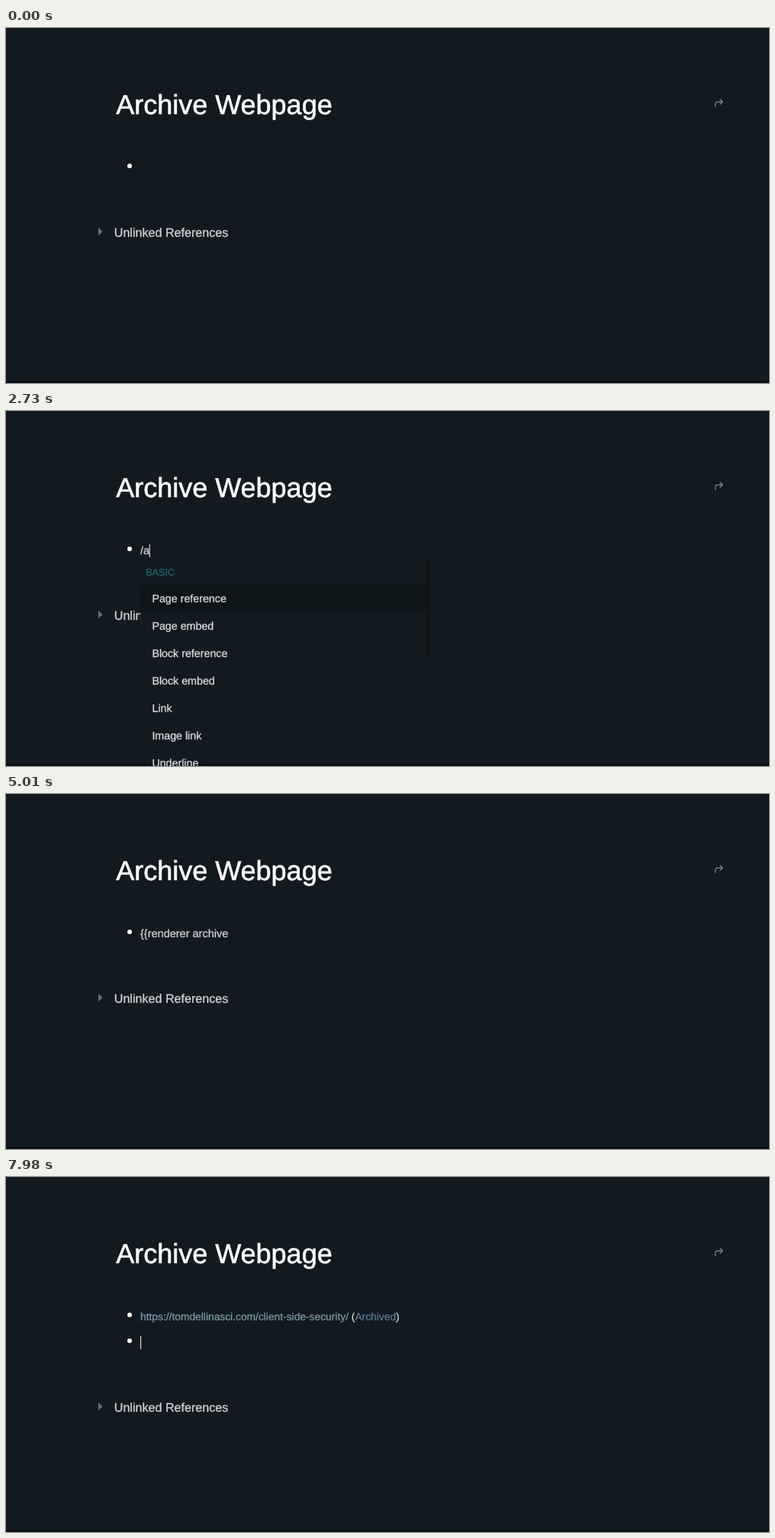
Animation, 1000 px wide and 466 px high, one loop 8 s. Source, as an HTML page:

```html
<!DOCTYPE html>
<html lang="en">
<head>
<meta charset="utf-8">
<title>Archive Webpage</title>
<style>
html, body { margin: 0; width: 100%; height: 100%; overflow: hidden; background: #0a0f15; }
svg { display: block; width: 100vw; height: 100vh; }
text {
  font-family: "Liberation Sans", Arial, Helvetica, sans-serif;
  text-rendering: geometricPrecision;
  white-space: pre;
  stroke-width: .25px;
}
text, tspan { fill: currentColor; stroke: currentColor; }
.title { font-size: 36px; color: #fff; stroke-width: .6px; }
.item { font-size: 14.25px; color: #dde1e3; }
.head { font-size: 12.6px; color: #2b6a80; stroke-width: .1px; }
.edit { font-size: 14.5px; color: #d3d8da; }
.ref { font-size: 16.1px; color: #d3d6d8; stroke-width: .3px; }
.link { font-size: 13.8px; color: #d8dcde; }
</style>
</head>
<body>
<svg id="stage" viewBox="0 0 1000 466" preserveAspectRatio="none">
  <rect width="1000" height="466" fill="#0a0f15"/>
  <rect width="999" height="463.5" rx="3" fill="#121a1f"/>
  <text class="title" x="144.2" y="113">Archive Webpage</text>
  <path d="M929.7 103.2v-2.7q0-3.6 3.6-3.6h5.6M936 93.8l3.2 3.1-3.2 3.1" fill="none"
    stroke="#858b8e" stroke-width="1.2" stroke-linecap="round" stroke-linejoin="round"/>
  <circle cx="162" cy="181" r="3" fill="#fff"/>
  <text id="line" class="edit" x="176" y="188" xml:space="preserve"></text>
  <g id="result">
    <text class="link" x="176" y="188"><tspan id="url" color="#8199a8"></tspan> (<tspan color="#5f7c91">Archived</tspan>)</text>
  </g>
  <circle id="bullet" cx="162" cy="215" r="3" fill="#fff"/>
  <g id="refs">
    <path d="M121 262l5.6 5.2-5.6 5.2z" fill="#697074"/>
    <text class="ref" x="141.8" y="273.5">Unlinked References</text>
  </g>
  <g id="full"></g>
  <g id="found"></g>
  <rect id="caret" width="1.1" height="17" fill="#e4e8ea"/>
</svg>
<script>
const LOOP = 8000;
const URL_TEXT = "https://tomdellinasci.com/client-side-security/";
const CALL = "{{renderer archive ";
const $ = id => document.getElementById(id);
const line = $("line"), caret = $("caret");

const rect = (x, y, w, h, fill, id = "") =>
  `<rect id="${id}" x="${x}" y="${y}" width="${w}" height="${h}" fill="${fill}"/>`;
const item = (s, y, x = 191.4) => `<text class="item" x="${x}" y="${y}">${s}</text>`;
const head = (s, y) => `<text class="head" x="183.2" y="${y}">${s}</text>`;
const panel = rect(176, 196, 380, 267.5, "#121a1f");
const DARK = "#0e1518";

const basics = ["Page reference", "Page embed", "Block reference", "Block embed",
  "Link", "Image link", "Underline"];
$("full").innerHTML = panel + rect(176, 228, 374, 36, DARK) +
  rect(550, 196, 6, 127, "#0d1316") + head("BASIC", 216) +
  basics.map((s, i) => item(s, 251 + 36 * i)).join("");

const globe = `<g transform="translate(199 252.3)" fill="none" stroke="#a5d3df" stroke-width=".7">
  <circle r="6.9" fill="#3f8fae" stroke="none"/>
  <circle r="6.4"/><ellipse rx="3" ry="6.4"/>
  <path d="M0-6.4V6.4M-6.4 0H6.4M-5.5-3.3H5.5M-5.5 3.3H5.5"/></g>`;
const puzzle = `<path transform="translate(520.7 239.4) scale(.85)" fill="none" stroke="#667074"
  stroke-width="1.4" stroke-linejoin="round" d="M4 7h3a1 1 0 0 0 1-1v-1a2 2 0 0 1 4 0v1a1 1 0 0 0 1 1h3
  a1 1 0 0 1 1 1v3a1 1 0 0 0 1 1h1a2 2 0 0 1 0 4h-1a1 1 0 0 0-1 1v3a1 1 0 0 1-1 1h-3a1 1 0 0 1-1-1v-1
  a2 2 0 0 0-4 0v1a1 1 0 0 1-1 1h-3a1 1 0 0 1-1-1v-3a1 1 0 0 1 1-1h1a2 2 0 0 0 0-4h-1a1 1 0 0 1-1-1v-3
  a1 1 0 0 1 1-1"/>`;
$("found").innerHTML = panel + rect(176, 196, 380, 36, DARK, "pick") +
  item("Cards", 219) + globe + item("Archive Webpage", 257.5, 209) + puzzle +
  head("TASK", 292.5) + item("LATER", 327.7) + item("Date picker", 363.7) +
  item("Calculator", 399.7) + head("BASIC", 432.5) + item("Page reference", 467.5);
$("url").textContent = URL_TEXT;

// Last entry whose time has passed
const at = (track, t) => track.reduce((v, [t0, x]) => (t >= t0 ? x : v), track[0][1]);

const typed = [[0, ""], [1680, "/"], [2730, "/a"], [2970, "/ar"], [4290, CALL],
  [5340, CALL + URL_TEXT], [6690, CALL + URL_TEXT + "}"],
  [7140, CALL + URL_TEXT + "}}"], [7680, ""]];
const blink = [[0, 0], [840, 1], [1320, 0], [1680, 1], [2160, 0], [2580, 1], [3420, 0],
  [3840, 1], [4770, 0], [5340, 1], [5940, 0], [6390, 1]];
const menu = [[0, ""], [1700, "full"], [2820, "found"], [4290, ""]];

const show = (id, on) => $(id).setAttribute("visibility", on ? "visible" : "hidden");

function draw(t) {
  const text = at(typed, t), open = at(menu, t), entered = t >= 7680;
  if (line.textContent !== text) line.textContent = text;
  show("full", open === "full");
  show("found", open === "found");
  const second = t >= 3930;
  $("pick").setAttribute("y", second ? 232 : 196);
  $("pick").setAttribute("height", second ? 40 : 36);
  show("bullet", entered);
  show("result", t >= 7920);
  $("refs").setAttribute("transform", `translate(0 ${entered ? 34 : 0})`);
  show("caret", at(blink, t));
  caret.setAttribute("x", 176 + (text ? line.getComputedTextLength() - .4 : 0));
  caret.setAttribute("y", entered ? 209 : 175);
}

function tick() {
  draw(performance.now() % LOOP);
  requestAnimationFrame(tick);
}
tick();
</script>
</body>
</html>
```
